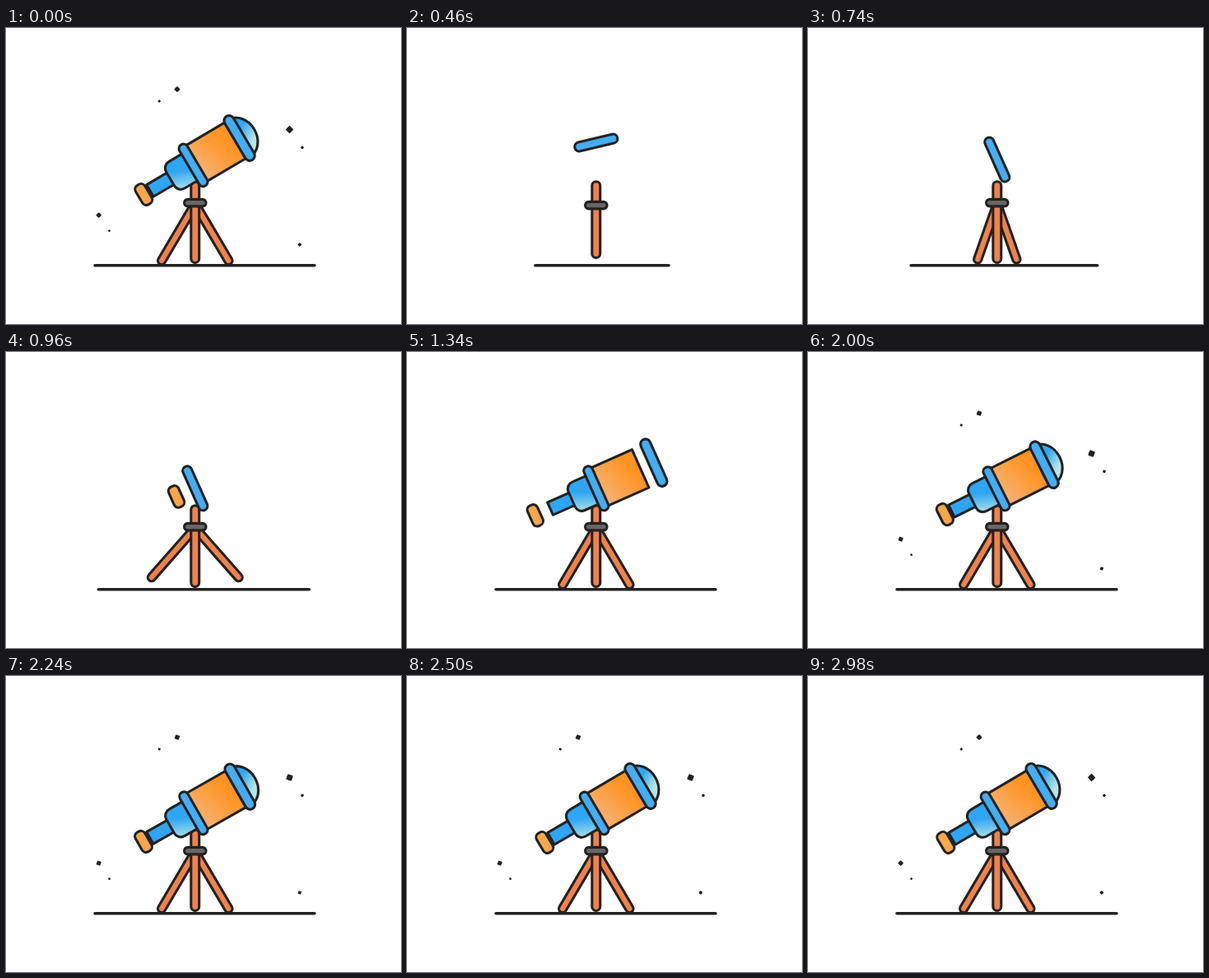
Write an HTML page with a canvas that moves like this. It is 480 px wide and 360 px high and loops after 3000 ms.

```html
<!DOCTYPE html>
<html lang="en">
<head>
<meta charset="utf-8">
<title>Telescope</title>
<style>
html, body { margin: 0; width: 100%; height: 100%; overflow: hidden; background: #fff; }
canvas { display: block; }
</style>
</head>
<body>
<canvas id="stage" width="480" height="360"></canvas>
<script>
const ctx = document.getElementById('stage').getContext('2d');
const INK = '#222', BLUE = '#2fa6f5', RIM = '#45adf3', WOOD = '#f0824b';
const LINE = 3.1, LOOP = 3000, RAD = Math.PI / 180;
let t = 0;

// Progress from 0 to 1 between two times
const part = (from, to) => Math.min(1, Math.max(0, (t - from) / (to - from)));

function smooth(from, to) {
  const p = part(from, to);
  return p * p * (3 - 2 * p);
}

// Rises past 1 by `extra`, then settles back to 1
const pop = (from, peak, to, extra) =>
  (1 + extra) * smooth(from, peak) - extra * smooth(peak, to);

function line(x1, y1, x2, y2, width, color) {
  ctx.beginPath();
  ctx.moveTo(x1, y1);
  ctx.lineTo(x2, y2);
  ctx.lineWidth = width;
  ctx.strokeStyle = color;
  ctx.stroke();
}

function bar(x1, y1, x2, y2, width, color) {
  line(x1, y1, x2, y2, width, INK);
  line(x1, y1, x2, y2, width - 2 * LINE, color);
}

function paint(fill) {
  ctx.fillStyle = fill;
  ctx.fill();
  ctx.lineWidth = LINE;
  ctx.strokeStyle = INK;
  ctx.stroke();
}

function box(x1, x2, half, radii, fill) {
  if (x2 - x1 < 1) return;
  ctx.beginPath();
  ctx.roundRect(x1, -half, x2 - x1, 2 * half, radii);
  paint(fill);
}

function blend(x1, y1, x2, y2, from, to) {
  const g = ctx.createLinearGradient(x1, y1, x2, y2);
  g.addColorStop(0, from);
  g.addColorStop(1, to);
  return g;
}

function ground() {
  const half = 133.5 * (1 - (1 - part(20, 1200)) ** 2);
  const mid = 237 + 4.5 * smooth(460, 1200);
  line(mid - half, 288.8, mid + half, 288.8, 3.5, INK);
}

function tripod() {
  if (t < 100) return;
  const x = 229.8, settle = smooth(460, 600);
  if (t > 560) {
    const angle = 30.5 * RAD * pop(560, 940, 1240, 0.36);
    const length = 55 + 25 * smooth(560, 860);
    const dx = length * Math.sin(angle), dy = length * Math.cos(angle);
    for (const side of [-1, 1]) bar(x, 214, x + side * dx, 214 + dy, 12.4, WOOD);
  }
  bar(x, 270 - 78.3 * smooth(100, 340), x, 274.5 + 6 * settle, 13, WOOD);
  if (t > 240) {
    const reach = 9 * smooth(240, 400), y = 215.6 - 3 * settle;
    bar(x - reach, y, x + reach, y, 11.6, '#686564');
  }
}

function telescope() {
  if (t < 300) return;
  const lean = smooth(1700, 2400);
  ctx.save();
  ctx.translate(
    229.8 - 2.2 * lean,
    186 - 46.5 * smooth(300, 460) + 26.3 * smooth(560, 820) + 1.1 * lean);
  ctx.rotate((-180 + 156 * smooth(300, 626) - 6.5 * lean) * RAD);

  box(-61 * smooth(1060, 1310), 0, 8.3, 0, BLUE);
  box(-32.5 * smooth(1000, 1270), 0, 18.8, [9, 0, 0, 9],
    blend(-16, -2, -25, 19, BLUE, '#a6dfe9'));
  box(0, 59 * smooth(970, 1300), 25.3, 0,
    blend(4, 10, 50, -4, '#f7b070', '#ff9422'));

  if (t > 1500) {
    ctx.beginPath();
    ctx.ellipse(65, 0, 21 * pop(1500, 1720, 1860, 0.14), 26, 0, -Math.PI / 2, Math.PI / 2);
    paint(blend(72, -10, 82, 8, BLUE, '#b4e6e8'));
  }
  if (t > 800) {
    const eye = -70 * pop(740, 1340, 1640, 0.157);
    box(eye - 6.6, eye + 6.6, 13.5, 5.6, '#faa64a');
  }
  if (t > 980) {
    const rim = 65 * pop(960, 1340, 1640, 0.18);
    bar(rim, -24.7, rim, 24.7, 15.4, RIM);
  }
  const half = 23.4 * smooth(300, 500);
  bar(0, -half, 0, half, 14.2, RIM);
  ctx.restore();
}

const STARS = [
  [208, 74.5, 3.6], [186.3, 89, 1.9], [344.6, 123.5, 4.7], [360, 145.3, 2.2],
  [112.7, 227.6, 3.4], [125.6, 246.6, 1.7], [356.9, 263.4, 2.5]
];

function stars() {
  const turn = (25 * smooth(2400, 2960) - 25) * RAD;
  ctx.fillStyle = INK;
  STARS.forEach(([x, y, size], i) => {
    const r = size * smooth(1660 + i * 20, 1860 + i * 20);
    ctx.beginPath();
    for (let k = 0; k < 8; k++) {
      const a = turn + k * Math.PI / 4, d = k % 2 ? r * 0.75 : r;
      ctx.lineTo(x + d * Math.cos(a), y + d * Math.sin(a));
    }
    ctx.fill();
  });
}

const start = performance.now();

function draw() {
  t = (performance.now() - start) % LOOP;
  if (t < 20) t = LOOP; // the finished scene holds until the cut
  ctx.fillStyle = '#fff';
  ctx.fillRect(0, 0, 480, 360);
  ctx.lineCap = 'round';
  ctx.lineJoin = 'round';
  ground();
  tripod();
  telescope();
  stars();
  requestAnimationFrame(draw);
}
draw();
</script>
</body>
</html>
```
